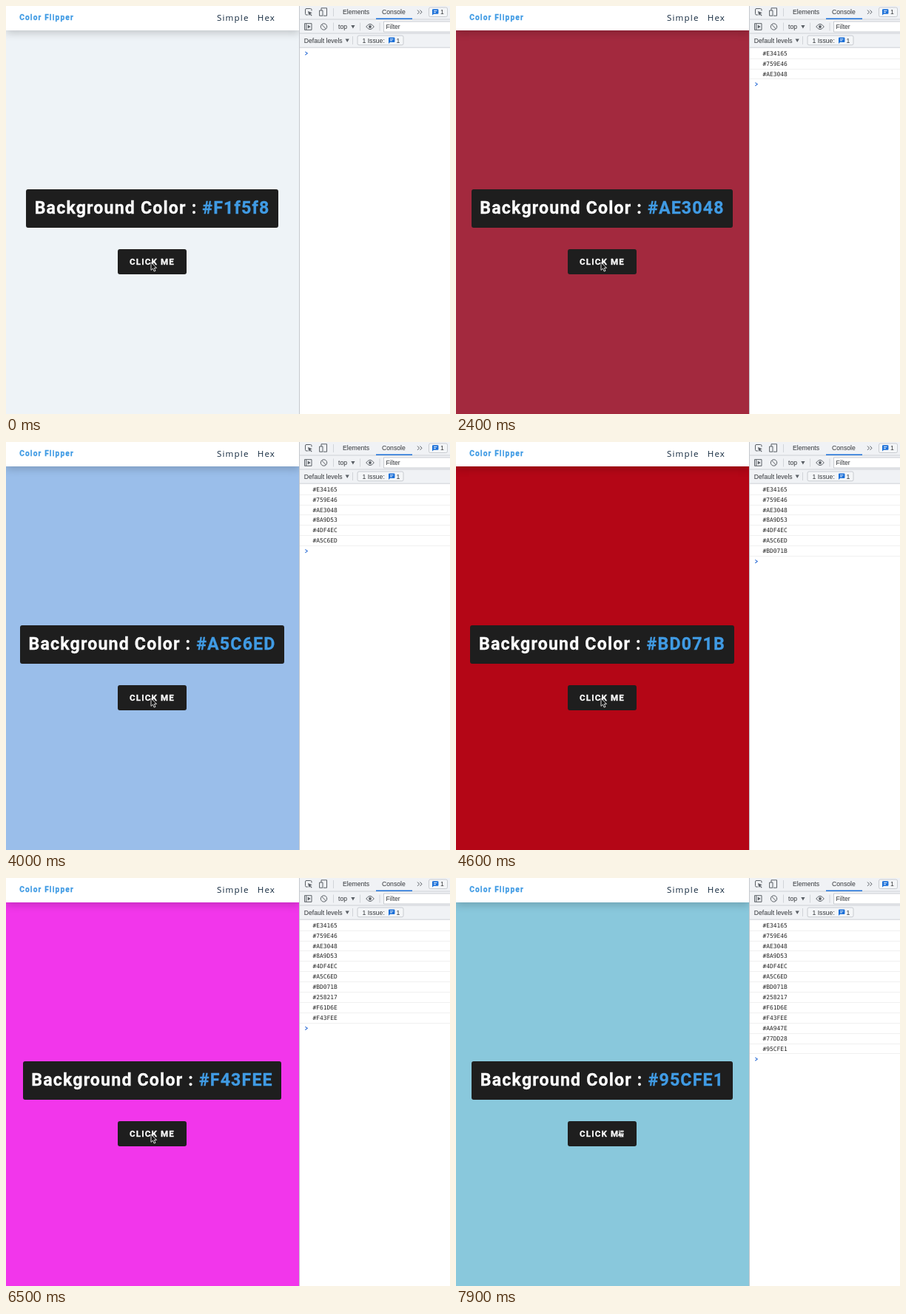
An HTML page for the animation above (8000 ms loop, 600 by 552 pixels).

```html
<!DOCTYPE html>
<html lang="en">
<head>
<meta charset="utf-8">
<title>Color Flipper</title>
<style>
  html, body { margin: 0; width: 100%; height: 100%; overflow: hidden; background: #fff; }
  #stage { position: relative; width: 600px; height: 552px; overflow: hidden; }
  #stage * { box-sizing: border-box; }
  #stage > *, nav span { position: absolute; white-space: pre; }

  #page { left: 0; top: 0; width: 397px; height: 552px; overflow: hidden; }
  #page > * { position: absolute; }
  nav {
    left: 0; top: 0; width: 397px; height: 33px; background: #fff;
    box-shadow: 0 3.6px 10.9px rgba(0, 0, 0, .2);
    font: 11.58px/16px "Open Sans", sans-serif; letter-spacing: 1.16px; color: #10263c;
  }
  nav .logo { left: 18.2px; top: 7.6px; font: 700 10.13px/16px Roboto, sans-serif; color: #409be4; }
  .row { left: 0; width: 395px; display: flex; justify-content: center; }
  .box {
    background: #1e1e1e; color: #fff; border-radius: 2.9px; white-space: pre;
    font-family: Roboto, sans-serif; font-weight: 700; letter-spacing: 1.16px;
  }
  .box, .logo { -webkit-text-stroke: .3px currentColor; }
  h2 { margin: 0; height: 52px; padding: 0 11.58px; font-size: 23.16px; line-height: 52px; }
  h2 span { color: #409be4; -webkit-text-stroke-color: #409be4; }
  .btn { height: 34px; padding: 0 15.9px; font-size: 11.58px; line-height: 34px; }

  #tools { left: 0; top: 0; }
  #tools text { font: 8.66px "Liberation Sans", Arial, sans-serif; fill: #34373b; }
  #log {
    left: 397px; top: 57.7px; width: 203px;
    font: 7.9px/13.92px "DejaVu Sans Mono", monospace; color: #252525;
  }
  #log div { height: 13.92px; padding-left: 17.5px; border-bottom: 1px solid #f0f0f0; }
  #prompt, #arrow, #hand { left: 0; top: 0; overflow: visible; }
</style>
</head>
<body>
<div id="stage">
  <div id="page">
    <nav>
      <span class="logo">Color Flipper</span>
      <span style="left:285px;top:8.3px">Simple</span>
      <span style="left:339.7px;top:8.3px">Hex</span>
    </nav>
    <div class="row" style="top:248px"><h2 class="box">Background Color : <span id="value"></span></h2></div>
    <div class="row" style="top:329px"><div class="box btn">CLICK ME</div></div>
  </div>

  <svg id="tools" width="600" height="552">
    <defs>
      <g id="chat">
        <path d="M1 0H7.4Q8.4 0 8.4 1V5.6Q8.4 6.6 7.4 6.6H2L0 8.4V1Q0 0 1 0Z" fill="#1a6fd8"/>
        <path d="M2 2.3H6.4M2 4.4H5" stroke="#fff" stroke-width=".9"/>
      </g>
    </defs>
    <rect x="397" width="203" height="552" fill="#fff"/>
    <rect x="397" width="203" height="56" fill="#f0f2f5"/>
    <path d="M397 18H600M397 37H600M397 56.2H600" stroke="#c9ccd1" stroke-width=".9"/>
    <path d="M396.500 0V552" stroke="#c4c8cd"/>
    <path d="M500 17.3H549" stroke="#1a6fd8" stroke-width="1.6"/>
    <path d="M442.5 3V14M442.5 22.5V33.5M478.5 22.5V33.5M505 22.5V33.5M468.5 41V52" stroke="#c9ccd1" stroke-width=".8"/>

    <g fill="none" stroke="#5b6066" stroke-width="1">
      <path d="M408 12H406Q404.500 12 404.500 10.500V5Q404.500 3.500 406 3.500H411.500Q413 3.500 413 5V6.500"/>
      <path d="M408 7L413.800 9.200L411.300 10.300L413.600 12.700L412.700 13.500L410.500 11.200L409.500 13.300Z" fill="#5b6066" stroke="none"/>
      <path d="M426 6V2.800H433.500V13.200H429M423.600 6H428V13.200H423.600Z"/>
      <path d="M403.500 23.700H413V32.300H403.500ZM405.700 24V32"/>
      <path d="M407.700 25.500V30.500L411.600 28Z" fill="#5b6066" stroke="none"/>
      <circle cx="429.500" cy="28" r="4.200"/>
      <path d="M426.500 25L432.500 31"/>
      <path d="M486.700 28Q492 20.800 497.300 28Q492 35.200 486.700 28Z"/>
      <circle cx="492" cy="28" r="1.900" fill="#5b6066" stroke="none"/>
    </g>

    <g fill="#f4f6f8" stroke="#c3c7cc" stroke-width=".9">
      <rect x="571.500" y="2" width="25" height="12.500" rx="2"/>
      <rect x="475" y="40" width="62" height="12.800" rx="2"/>
      <path d="M601 21H510.500V35H601" fill="#fff"/>
    </g>
    <use href="#chat" x="576" y="4.200"/>
    <use href="#chat" x="517" y="42.500"/>
    <path d="M466.300 26H471.500L468.900 30.500ZM458.600 44.500H463.800L461.200 49Z" fill="#5b6066"/>
    <path d="M556 5.500L558.500 8.200L556 10.900M559.500 5.500L562 8.200L559.500 10.900" fill="none" stroke="#5b6066"/>
    <text x="455" y="11.200">Elements</text>
    <text x="508" y="11.200">Console</text>
    <text x="587" y="11.400">1</text>
    <text x="449" y="30.800">top</text>
    <text x="513.500" y="31.200">Filter</text>
    <text x="402.700" y="49.500">Default levels</text>
    <text x="481.500" y="49.600">1 Issue:</text>
    <text x="527.500" y="49.600">1</text>
  </svg>

  <div id="log"></div>
  <svg id="prompt" width="1" height="1">
    <path d="M404.300 -2.200L407.300 0L404.300 2.200" fill="none" stroke="#3674d8" stroke-width="1.100"/>
  </svg>

  <svg id="arrow" width="1" height="1">
    <path transform="translate(196 346.800) scale(.92)" d="M0 0V11.500L2.700 9.100L4.500 13.300L6.500 12.400L4.700 8.300H8.200Z"
          fill="#141414" stroke="#fff" stroke-width=".9"/>
  </svg>
  <svg id="hand" width="1" height="1">
    <path transform="translate(217.500 340.500)"
          d="M2.500 .8Q3.500 0 4.300 1V3.800L8 4.300Q9.500 4.600 9.400 6L8.700 10.300H3.700L.5 6.500Q.6 5.300 2.500 6.200Z"
          fill="#fff" stroke="#1e1e1e" stroke-width=".7"/>
    <path d="M222.800 344.800V347.200M224.600 345V347.200M221.500 348.500V350M223.500 348.500V350" stroke="#1e1e1e" stroke-width=".7"/>
  </svg>
</div>

<script>
  const LOOP = 8000, HAND_AT = 7800, ROW = 13.92;
  const clicks = [
    [100, '#E34165'], [1100, '#759E46'], [2400, '#AE3048'], [2900, '#8A9D53'],
    [3500, '#4DF4EC'], [3900, '#A5C6ED'], [4500, '#BD071B'], [5100, '#258217'],
    [5700, '#F61D6E'], [6200, '#F43FEE'], [6800, '#AA947E'], [7300, '#77DD28'],
    [7800, '#95CFE1']
  ];
  const get = id => document.getElementById(id);
  const page = get('page'), value = get('value'), log = get('log');

  // Screen capture darkens the midtones a little.
  function shade(hex) {
    const parts = [1, 3, 5].map(i => {
      const c = parseInt(hex.slice(i, i + 2), 16) / 255;
      return Math.round(255 * (c - .19 * c * (1 - c)));
    });
    return `rgb(${parts})`;
  }

  const rows = clicks.map(([, hex]) => {
    const row = document.createElement('div');
    row.textContent = hex;
    log.append(row);
    return row;
  });

  let shown = -1;
  function draw(t) {
    const count = clicks.filter(([at]) => at <= t).length;
    get('arrow').style.display = t < HAND_AT ? '' : 'none';
    get('hand').style.display = t < HAND_AT ? 'none' : '';
    if (count === shown) return;
    shown = count;
    const hex = count ? clicks[count - 1][1] : '#F1f5f8';
    page.style.background = shade(hex);
    value.textContent = hex;
    rows.forEach((row, i) => row.style.display = i < count ? '' : 'none');
    get('prompt').style.transform = `translateY(${64.1 + ROW * count}px)`;
  }

  const start = performance.now();
  function tick() {
    draw((performance.now() - start) % LOOP);
    requestAnimationFrame(tick);
  }
  tick();
</script>
</body>
</html>
```
